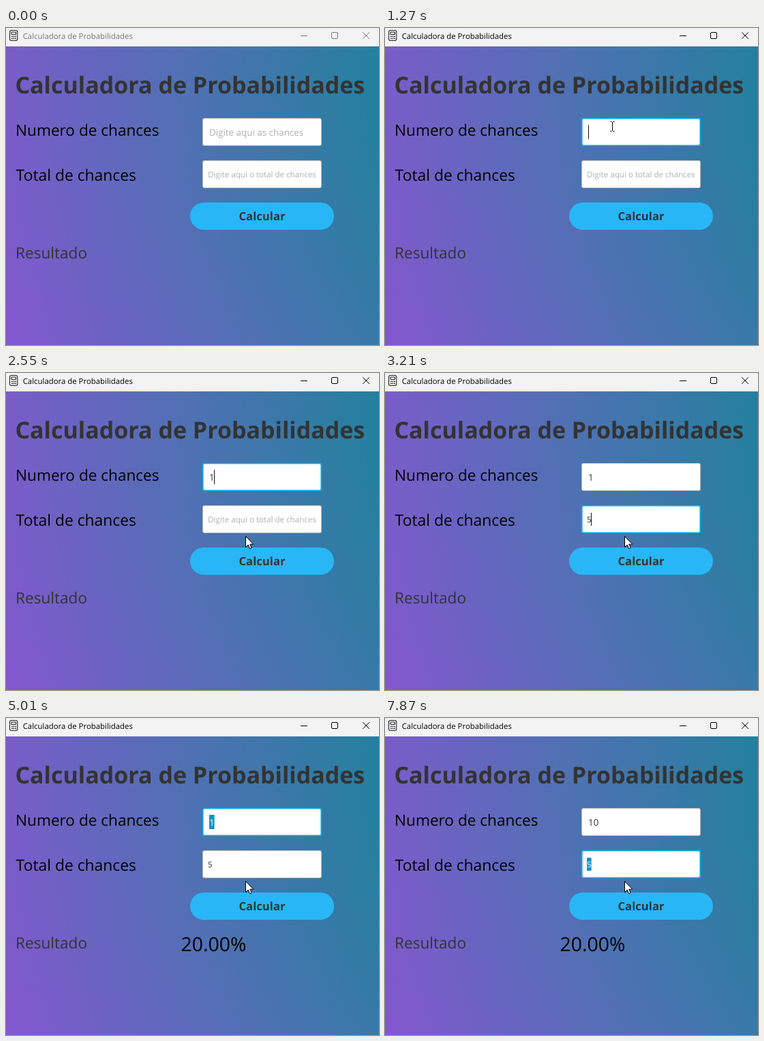
An HTML page that plays this animation: 547 by 465 pixels, repeating every 8000 ms.

```html
<!DOCTYPE html>
<html lang="pt">
<head>
<meta charset="utf-8">
<title>Calculadora de Probabilidades</title>
<style>
html, body { margin: 0; width: 100%; height: 100%; overflow: hidden; }
svg { display: block; width: 547px; height: 465px; }
text { font-family: "Open Sans", "Noto Sans", sans-serif; text-rendering: geometricPrecision; white-space: pre; }
.label { font-size: 22.6px; }
.bold { font-weight: 700; fill: #333; }
</style>
</head>
<body>
<svg id="stage" viewBox="0 0 547 465">
  <defs>
    <radialGradient id="bg" gradientUnits="userSpaceOnUse" cx="1000" cy="90" r="1068">
      <stop offset=".424" stop-color="#24809e"/>
      <stop offset=".685" stop-color="#4f71b3"/>
      <stop offset="1" stop-color="#8457cf"/>
    </radialGradient>
  </defs>
  <rect width="547" height="465" fill="url(#bg)"/>
  <rect width="547" height="27" fill="#f3f3f3"/>

  <g fill="none" stroke="#222" stroke-width="1.1">
    <rect x="5.5" y="3.5" width="11.3" height="15" rx="2.4"/>
    <rect x="8" y="6" width="6.5" height="3.5" rx=".8"/>
    <path d="M8 12.5h7M8 15.5h7" stroke-width="1.7" stroke-dasharray="1.7 .9"/>
  </g>
  <g id="bar">
    <text x="24.7" y="16" font-size="11.4">Calculadora de Probabilidades</text>
    <path fill="none" stroke="currentColor" d="M432 11.5h10M523.3 6.3l9.6 9.6M532.9 6.3l-9.6 9.6"/>
    <rect x="477.5" y="6.5" width="9" height="9" rx="1.5" fill="none" stroke="currentColor"/>
  </g>

  <text class="bold" x="13.4" y="95.8" font-size="34">Calculadora de Probabilidades</text>
  <text class="label" x="14" y="158">Numero de chances</text>
  <text class="label" x="14.6" y="224" style="font-size:22.85px">Total de chances</text>
  <text class="label" x="14" y="338" fill="#333">Resultado</text>
  <text id="result" x="256.5" y="342" font-size="28.4">20.00%</text>

  <rect x="270" y="256" width="211" height="40" rx="20" fill="#29b6f6"/>
  <text class="bold" x="375.5" y="282" font-size="16.7" text-anchor="middle">Calcular</text>

  <g id="fields"></g>
  <path id="arrow" d="M.5 .5V16.6L4.2 13.1L6.7 18.7L9.2 17.6L6.8 12.2H11.8Z" fill="#fff" stroke="#000" stroke-linejoin="round"/>
  <path id="beam" d="M-2.5 -7.5h2M1.5 -7.5h2M.5 -7v13M-2.5 6.5h2M1.5 6.5h2" fill="none" stroke="#000"/>
</svg>
<script>
const $ = id => document.getElementById(id);
const show = (el, on) => el.setAttribute('visibility', on ? 'visible' : 'hidden');

function makeField(y, hint, size, x, base, selY, selH) {
  const g = document.createElementNS('http://www.w3.org/2000/svg', 'g');
  g.innerHTML = `
    <rect x="288.5" y="${y + .5}" width="174" height="40" rx="2.5" fill="#fff" stroke="#b5b5b5"/>
    <g>
      <rect x="286.6" y="${y - 1.4}" width="177.8" height="43.8" rx="4" fill="#039ed3" opacity=".13"/>
      <rect x="288.8" y="${y + .8}" width="173.4" height="39.4" rx="2.5" fill="#fff" stroke="#0aaee4" stroke-width="1.6"/>
    </g>
    <rect x="${x}" y="${selY}" width="${size * .571}" height="${selH}" fill="#0096c9"/>
    <text x="${x}" y="${base}" font-size="${size}"></text>
    <rect y="${selY}" width="1" height="${selH}" fill="#111"/>`;
  $('fields').append(g);
  const [, ring, sel, text, caret] = g.children;
  return (value, focus, selected, caretOn) => {
    show(ring, focus);
    show(sel, focus && selected);
    show(caret, focus && caretOn);
    caret.setAttribute('x', Math.floor(x + (selected ? 0 : value.length * size * .566)));
    text.textContent = value || (focus ? '' : hint);
    text.setAttribute('fill', !value ? '#b0b0b0' : focus && selected ? '#fff' : '#323232');
  };
}
const chances = makeField(132, 'Digite aqui as chances', 13.4, 298, 158, 142, 21);
const total = makeField(194, 'Digite aqui o total de chances', 11.6, 296, 219, 205, 19);

// time, chances, total, focused field, selected, caret
const states = [
  [0, '', '', 0, 0, 0],
  [1140, '', '', 1, 0, 1],
  [1660, '', '', 1, 0, 0],
  [2280, '', '', 1, 0, 1],
  [2550, '1', '', 1, 0, 1],
  [2880, '1', '', 2, 0, 1],
  [3210, '1', '5', 2, 0, 1],
  [3560, '1', '5', 1, 1, 1],
  [4020, '1', '5', 1, 1, 0],
  [4550, '1', '5', 1, 1, 1],
  [5010, '1', '5', 1, 1, 0],
  [5080, '1', '5', 1, 0, 1],
  [5410, '10', '5', 1, 0, 1],
  [5870, '10', '5', 1, 0, 0],
  [6330, '10', '5', 2, 1, 1],
  [6790, '10', '5', 2, 1, 0],
  [7340, '10', '5', 2, 1, 1],
  [7870, '10', '5', 2, 1, 0]
];

// Progress from 0 to 1 in n equal jumps
const steps = (t, from, to, n) =>
  Math.min(n, Math.max(0, Math.floor((t - from) / (to - from) * n + 1e-6))) / n;
const bezier = (a, b, c, p) => (1 - p) ** 2 * a + 2 * p * (1 - p) * b + p * p * c;

function pointer(t) {
  if (t < 1140) {
    const p = 1 - (1 - steps(t, 240, 790, 8)) ** 1.6;
    return [bezier(451, 402, 332, p), bezier(388, 230, 140, p)];
  }
  const q = steps(t, 1140, 1750, 7), p = q * q * (3 - 2 * q);
  return [332 + 19 * p, 140 + 99 * p];
}

function draw(t) {
  const [, a, b, focus, selected, caret] = states.findLast(s => s[0] <= t);
  chances(a, focus === 1, selected, caret);
  total(b, focus === 2, selected, caret);
  show($('result'), t >= 3560);
  const ink = t < 1140 ? '#777' : '#000';
  $('bar').setAttribute('fill', ink);
  $('bar').setAttribute('color', ink);

  const [x, y] = pointer(t).map(Math.round);
  const inField = x > 288 && x < 463 && (y > 132 && y < 173 || y > 194 && y < 235);
  show($('arrow'), t >= 240 && !inField);
  show($('beam'), t >= 240 && inField);
  for (const id of ['arrow', 'beam']) $(id).setAttribute('transform', `translate(${x} ${y})`);
}

const start = performance.now();
function tick() {
  draw((performance.now() - start) % 8000);
  requestAnimationFrame(tick);
}
tick();
</script>
</body>
</html>
```
